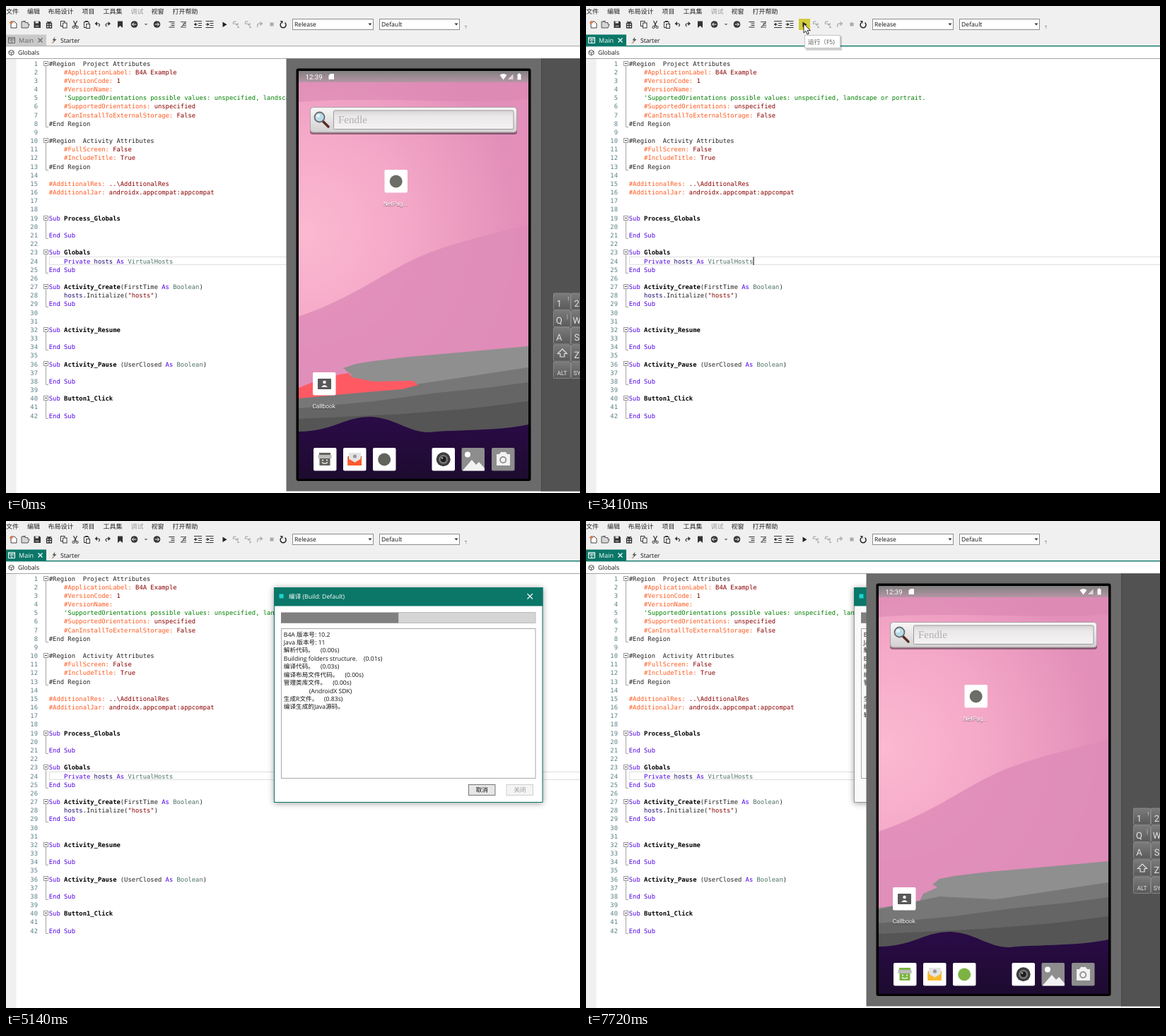
An HTML page that plays this animation: 812x690 px, repeating every 8 s.

```html
<!DOCTYPE html>
<html lang="zh">
<head>
<meta charset="utf-8">
<title>IDE build</title>
<style>
html, body { margin: 0; width: 100%; height: 100%; overflow: hidden; background: #fff; }
svg { display: block; }
text { white-space: pre; text-rendering: geometricPrecision;
  font: 8.65px "Open Sans", "Noto Sans CJK SC", "Noto Sans CJK", sans-serif; }
.code text { font: 8.84px "DejaVu Sans Mono", monospace; }
.droid text { font-family: Roboto, sans-serif; }
</style>
</head>
<body>
<svg id="stage" width="812" height="690" viewBox="0 0 812 690">
<defs>
  <linearGradient id="status" x2="0" y2="1"><stop stop-color="#808080"/><stop offset="1" stop-color="#b595a5"/></linearGradient>
  <radialGradient id="glow" gradientUnits="userSpaceOnUse" cx="420" cy="320" r="310">
    <stop stop-color="#fcb9d0"/><stop offset=".45" stop-color="#f5a9c8"/><stop offset="1" stop-color="#e28fb9"/>
  </radialGradient>
  <linearGradient id="night" x2="0" y2="1"><stop stop-color="#2a0b47"/><stop offset="1" stop-color="#1d0b2f"/></linearGradient>
  <linearGradient id="plate" x2="0" y2="1"><stop stop-color="#f8f6f7"/><stop offset="1" stop-color="#d2d0d1"/></linearGradient>
  <linearGradient id="field" x2="0" y2="1"><stop stop-color="#d8d5d6"/><stop offset=".3" stop-color="#ebe8e9"/><stop offset="1" stop-color="#f5f3f4"/></linearGradient>
  <linearGradient id="key" x2="0" y2="1"><stop stop-color="#7b7b7b"/><stop offset="1" stop-color="#5a5a5a"/></linearGradient>
  <clipPath id="screen"><path d="M414 92H739V670H414z"/></clipPath>
  <path id="arrow" d="M0 0V13L3 10.3L5 15L7.2 14L5.2 9.6H9.4z"/>
</defs>
</svg>
<script>
const LOOP = 8000, TEAL = '#0a7768', ROW = 12.17;
const stage = document.getElementById('stage');
const rect = (x, y, w, h, fill, more = '') => `<rect x="${x}" y="${y}" width="${w}" height="${h}" fill="${fill}" ${more}/>`;
const line = (d, color = '#333', w = 1, more = '') => `<path d="${d}" fill="none" stroke="${color}" stroke-width="${w}" ${more}/>`;
const area = (d, fill = '#333', more = '') => `<path d="${d}" fill="${fill}" ${more}/>`;
const dot = (x, y, r, fill, more = '') => `<circle cx="${x}" cy="${y}" r="${r}" fill="${fill}" ${more}/>`;
const text = (x, y, s, fill = '#111', more = '') => `<text x="${x}" y="${y}" fill="${fill}" ${more}>${s}</text>`;
const group = (id, body, more = '') => `<g id="${id}" ${more}>${body}</g>`;

// ---- editor ----
// A tilde and a letter switch the colour of the text that follows.
const INK = { k: '#222', o: '#ff5a1f', r: '#8b0000', g: '#008000', b: '#5000e6', i: '#1c0a6a', t: '#4c7263', B: '#000' };
const SOURCE = `~k#Region  Project Attributes
    ~o#ApplicationLabel: ~rB4A Example
    ~o#VersionCode: ~r1
    ~o#VersionName:
    ~g'SupportedOrientations possible values: unspecified, landscape or portrait.
    ~o#SupportedOrientations: ~runspecified
    ~o#CanInstallToExternalStorage: ~rFalse
~k#End Region

~k#Region  Activity Attributes
    ~o#FullScreen: ~rFalse
    ~o#IncludeTitle: ~rTrue
~k#End Region

~o#AdditionalRes: ~r..\\AdditionalRes
~o#AdditionalJar: ~randroidx.appcompat:appcompat


~bSub ~BProcess_Globals

~bEnd Sub

~bSub ~BGlobals
    ~bPrivate ~ihosts ~bAs ~tVirtualHosts
~bEnd Sub

~bSub ~BActivity_Create~k(FirstTime ~bAs ~tBoolean~k)
    ~ihosts~k.Initialize(~r"hosts"~k)
~bEnd Sub


~bSub ~BActivity_Resume

~bEnd Sub

~bSub ~BActivity_Pause ~k(UserClosed ~bAs ~tBoolean~k)

~bEnd Sub

~bSub ~BButton1_Click

~bEnd Sub`.split('\n');

function codeLine(s, i) {
  const y = (84.6 + ROW * i).toFixed(2);
  const [indent, ...parts] = s.split('~');
  const spans = parts.map(p => `<tspan fill="${INK[p[0]]}"${p[0] === 'B' ? ' font-weight="700"' : ''}>${p.slice(1)}</tspan>`);
  return text(45, y, i + 1, '#5b8087', 'text-anchor="end"') + text(60.8, y, indent + spans.join(''));
}

function fold([from, to]) {
  const y = Math.round(81.5 + ROW * (from - 1)), end = Math.round(81.5 + ROW * (to - 1)) + 4;
  return rect(53.5, y - 3.5, 6, 6, '#fff', 'stroke="#999"') + line(`M55 ${y - .5}h3`, '#444') +
    line(`M56.5 ${y + 3}V${end + .5}H60`, '#a5a5a5');
}

const menu = [[0, '文件'], [30, '编辑'], [59.5, '布局设计'], [107.5, '项目'], [137.5, '工具集'], [176.5, '调试'], [205.5, '视窗'], [235.5, '打开帮助']]
  .map(([x, s]) => text(x, 10.6, s, s === '调试' ? '#999' : '#222', 'style="font-size:9px"')).join('');

const textIcon = (x, c) => line(`M${x} 22.5h8M${x + 3} 25h5M${x + 3} 27.5h5M${x} 30h8`, c);
const indentIcon = (x, d) => line(`M${x} 21.5h11M${x + 6} 24.5h5M${x + 6} 27.5h5M${x} 30.5h11M${x} 26h5`) +
  area(`M${x + (d > 0 ? 5 : 0)} 26l${-3 * d} -2.5v5z`);
const navIcon = (x, d) => dot(x, 26, 4.8, '#333') + line(`M${x - 3} 26h6M${x + d * .5} 23.5l${d * 2.5} 2.5l${-d * 2.5} 2.5`, '#fff');
const stepIcon = x => line(`M${x + 1} 26q-1 -5 4 -4M${x + 2} 25q4 0 5 2M${x + 7.5} 24v3h-3`, '#aaa', 1.2) + dot(x + 8, 30, 1.3, '#aaa');
const undoIcon = (x, d) => line(`M${x} 25h${d * 3.5}q${d * 3} 1.5 0 4`, '#333', 1.2) + area(`M${x - d * 2} 25l${d * 3.5} -3v6z`);
const combo = (x, w, s) => rect(x + .5, 18.5, w, 15, '#fff', 'stroke="#8c8c8c"') + text(x + 3, 29.3, s) +
  area(`M${x + w - 6.5} 24.5h5l-2.5 3z`);

const toolbar =
  area('M7 22h5l3 3v6H7z', '#fff', 'stroke="#444"') + line('M5 23.5h5M7.5 21v5', '#e8703a', 1.4) +
  area('M22 31V22h4l1 1.5h4V26h2l-2 5z', '#d6d6d6', 'stroke="#555"') + line('M24 21.5h4', '#555') +
  area('M39.5 21.5h8l1.5 1.5v8h-9.5z', '#333') + rect(41.5, 21.5, 4.5, 3, '#ddd') + rect(41.5, 27, 5, 3, '#777') +
  line('M57 24.5h8M57 27.5h8M57 31h8M57.5 24v7M61 22v9M64.5 24v7M58 22l3 2l3 -2', '#333', 1.3) +
  rect(77.5, 21.5, 5.5, 7, '#fff', 'stroke="#333"') + rect(80.5, 24, 5.5, 7, '#fff', 'stroke="#333"') +
  line('M95.5 21l4 8M100.5 21l-4 8', '#333', 1.2) + dot(95.5, 30, 1.6, 'none', 'stroke="#333"') + dot(100.5, 30, 1.6, 'none', 'stroke="#333"') +
  rect(110.5, 22.5, 6.5, 8, '#fff', 'stroke="#333"') + rect(113.5, 25.5, 5, 6, '#fff', 'stroke="#333"') + rect(112, 21, 4, 2, '#333') +
  undoIcon(127.5, 1) + undoIcon(146, -1) + area('M158 21.5h7v9.5l-3.5 -3l-3.5 3z') +
  navIcon(181.5, -1) + area('M195.5 25h5l-2.5 2.5z', '#777') + navIcon(213.5, 1) +
  textIcon(230.5, '#333') + textIcon(247, '#555') + line('M254 23l-6 7') + indentIcon(266, -1) + indentIcon(282.5, 1) +
  rect(301, 18, 16, 16, '#d3cc3a', 'id="hover"') + area('M306.5 22.5l6 3.7l-6 3.7z', '#222') +
  stepIcon(320.5) + stepIcon(337.5) + line('M356 30q-2 -6 5 -5M359.5 22.5l3 2.5l-3 2.5', '#aaa', 1.3) +
  rect(373.5, 23.5, 5, 5, '#aaa') + line('M389.7 23.5a4 4 0 1 0 4.8 0', '#222', 1.5) + area('M387.5 21h4v4z') +
  combo(405, 114, 'Release') + combo(528, 113, 'Default') + line('M649 28.5h3M650 31h1.5', '#888');

const ide =
  rect(0, 0, 812, 75, '#f0f0f0') + menu + toolbar +
  rect(0, 40.5, 57, 16, TEAL, 'id="tab"') + rect(0, 56, 812, 1.6, TEAL, 'id="rule"') +
  group('tabInk',
    '<path d="M3.5 44.5h9v8h-9zM3.5 46.5h9M8 47v5M5 49h2M9.5 49h2" fill="none" stroke="currentColor"/>' +
    '<path d="M45.5 45.5l6 6M51.5 45.5l-6 6" stroke="currentColor" stroke-width="1.2"/>' +
    text(18, 51.7, 'Main', 'currentColor', 'style="font-size:9px"')) +
  area('M69.5 43.5l-4 5h2.5l-2.5 5l6 -6.5h-3z', '#555') + line('M64.5 53l3 -3', '#f08a3c') + text(77, 51.7, 'Starter') +
  rect(0, 57.6, 812, 17, '#fff') + area('M7.5 62.5l3.5 1.8v3.5l-3.5 2l-3.5 -2v-3.5z', '#fff', 'stroke="#444"') +
  line('M4 64.5l3.5 1.7l3.5 -1.7M7.5 66v3.5', '#444', .8) + text(17, 69.2, 'Globals') +
  rect(0, 74, 812, 1, '#a4a4a4') + rect(0, 75, 14.5, 615, '#f0f0f0') +
  line('M812 355.5H61.5V366.5H812', '#dedede') +
  `<g class="code">${SOURCE.map(codeLine).join('')}</g>` +
  [[1, 8], [10, 13], [19, 21], [23, 25], [27, 29], [32, 34], [36, 38], [40, 42]].map(fold).join('') +
  rect(236.5, 355.5, 1, 11.5, '#000', 'id="caret"');

const runTip = rect(311, 43, 51, 20, '#000', 'opacity=".18"') + rect(309.5, 41.5, 50, 18, '#fff', 'stroke="#c4c4c4"') +
  text(314, 53.5, '运行（F5)', '#555');

// ---- build dialog ----
const LOG = ['B4A 版本号: 10.2', 'Java 版本号: 11', '解析代码。    (0.00s)', 'Building folders structure.    (0.01s)',
  '编译代码。    (0.03s)', '编译布局文件代码。    (0.00s)', '管理类库文件。    (0.00s)', '                (AndroidX SDK)',
  '生成R文件。', '编译生成的Java源码。', '转换字节码-优化dexer模式。'];
const logY = i => 163.6 + 11.42 * i;
const took = (i, x, s) => text(x, logY(i), s, '#111', `id="took${i}"`);
const button = (x, s, ink, edge, fill) => rect(x + .5, 373.5, 37.5, 15, fill, `stroke="${edge}"`) +
  text(x + 19.3, 384.2, s, ink, 'text-anchor="middle"');
const dialog =
  rect(379.5, 94.5, 379.5, 304, '#fff', `id="pane" style="filter:drop-shadow(0 1px 4px #0006)"`) +
  rect(379, 94, 380.5, 26.5, TEAL) + rect(386.5, 103.5, 6, 6, '#1fd3d0') +
  group('caption', text(400, 110.3, '编译 (Build: Default)', '#fff') + line('M737.5 103l7.5 7.5M745 103l-7.5 7.5', '#fff', 1.1)) +
  rect(389.5, 129.5, 359.5, 15, '#d5d5d5', 'stroke="#bcbcbc"') + rect(389, 130, 0, 14.5, '#808080', 'id="bar"') +
  rect(389.5, 152.5, 359.5, 212, '#fff', 'id="list" stroke="#a8a8a8"') +
  LOG.map((s, i) => text(392.8, logY(i), s, '#111', `id="log${i}"`)).join('') +
  took(8, 450, '(0.83s)') + took(9, 488.5, '(2.06s)') +
  button(654, '取消', '#111', '#777', '#e6e6e6') + button(707.5, '关闭', '#999', '#cfcfcf', '#f4f4f4');

// ---- phone emulator ----
const tile = (x, y, fill = '#fff') => rect(x, y, 32.5, 32.5, fill, 'rx="2"');
const caption = (x, y, s) => text(x, y, s, '#fff', 'text-anchor="middle" style="font-size:8.4px;text-shadow:0 1px 1px #0008"');
const keyCap = (row, col, s, size, dx = 8) => rect(774.5 + 25 * col, 407 + 24.3 * row, 24, 23.3, 'url(#key)', 'stroke="#858585" rx="1"') +
  text(774.5 + 25 * col + dx, 425.7 + 24.3 * row, s, '#e2e2e2', `text-anchor="middle" style="font-size:${size}px"`);
const keys = ['1 2', 'Q W', 'A S', '\u00a0 Z'].map((r, i) => r.split(' ').map((s, c) => keyCap(i, c, s, 13)).join('')).join('') +
  `<g font-weight="700">${keyCap(4, 0, 'ALT', 8.5, 12)}${keyCap(4, 1, 'SYM', 8.5, 12)}</g>` +
  text(794.5, 418, '!', '#ccc') + text(793, 443, '|', '#ccc') +
  line('M787 486l6.5 6.5h-3.5v4.5h-6v-4.5h-3.5z', '#e2e2e2', 1.2);

const hills =
  area('M739 482L640 491L570 497L520 503L500 507L490 515L497 519L477 528L472 538L450 543L414 548V620H739z', '#8f8f8f') +
  area('M414 550L500 532L580 536L660 524L739 512V620H414z', '#777') +
  area('M414 570L520 560L610 548L680 541L739 533V620H414z', '#656565') +
  area('M414 585L560 578L660 570L739 560V620H414z', '#555');
const lava =
  area('M520 503L495 507L477 513L484 519L495 527L540 533L576 531z', '#8f8f8f') +
  area('M414 541L434 533L467 523L485 520L489 526L520 532L576 531L583 537L560 543L500 548L414 556z', '#ff5a63');
const wallpaper =
  rect(414, 92, 325, 578, 'url(#glow)') +
  area('M414 108H739V132C650 140 520 128 414 136z', '#da87b2', 'opacity=".6"') +
  area('M739 310C690 322 640 334 600 349C540 372 500 410 414 440V560H739z', '#df8cb9', 'opacity=".85"') +
  hills + group('lava', lava) +
  area('M414 603C465 602 475 583 515 582C550 583 570 605 600 604C630 600 690 603 739 593V670H414z', 'url(#night)');

const search =
  rect(430, 144, 293, 38, '#0006', 'rx="4"') + rect(430.5, 143.5, 292, 35.5, 'url(#plate)', 'rx="4" stroke="#aaa2a6"') +
  rect(463.5, 148, 254.5, 26.5, 'url(#field)', 'rx="2" stroke="#9f9a9c"') +
  text(470, 165.5, 'Fendle', '#b3afb1', 'style="font:15px \'Liberation Serif\',serif"') +
  line('M448 163l8 8', '#5b2a25', 3.5, 'stroke-linecap="round"') + dot(443.5, 157.5, 7, '#b9dbe8', 'stroke="#6d6d6d" stroke-width="1.8"') +
  dot(441.5, 155.5, 2.5, '#e6f5fa');

const apps =
  tile(535.5, 232) + dot(551.7, 248.5, 9, '#6b6d66') + caption(551, 283.2, 'NetPag...') +
  tile(434, 519) + rect(441, 528, 19, 15, '#585858', 'rx="1"') + dot(450.5, 533, 2.3, '#eee') + area('M446 540q4.5 -6 9 0z', '#eee') +
  caption(449.7, 570.3, 'Callbook') +
  tile(435, 626) + area('M443 633h16v3h-16zM443.5 640h15v11h-15z', 'currentColor') + rect(441.5, 636, 19, 5, '#bbb') +
  dot(448, 643.5, 1, '#fff') + dot(454, 643.5, 1, '#fff') + line('M447 646.5q4 3.5 8 0', '#fff', 1.2) +
  tile(477, 626) + rect(483.5, 638, 19.5, 13, 'var(--mail)') + area('M485 633h17v9l-8.5 5l-8.5 -5z', '#e3e3e3') + dot(493.5, 638, 2.6, '#999') +
  area('M483.5 641l9.8 6l9.7 -6v10h-19.5z', 'var(--flap)') +
  tile(519, 626) + dot(535.2, 642.5, 9, 'currentColor') +
  tile(602.5, 626) + dot(618.7, 642.3, 10, '#3d3d3d') + dot(618.7, 642.3, 6.5, '#777') + dot(618.7, 642.3, 4, '#1d1d1d') + dot(617, 640.5, 1.2, '#bbb') +
  tile(644.5, 626, '#8d8d8d') + dot(653, 635.5, 4, '#fff') + area('M646 658l13 -15l6 7l4 -4l8 9v3.5h-31z', '#f2f2f2') +
  tile(687, 626, '#8d8d8d') + area('M694 635h4l2 -3h7l2 3h4v16h-19z', '#f2f2f2') + dot(703.2, 643, 5, '#8d8d8d') + dot(703.2, 643, 3.2, '#f2f2f2');

const phone =
  rect(396.5, 74.5, 416, 613, '#6b6b6b') + rect(757, 74.5, 55, 613, '#525252') + rect(757, 74.5, 1, 613, '#474747') +
  rect(410.5, 88.5, 332, 584.5, '#000', 'rx="3"') +
  `<g clip-path="url(#screen)">${wallpaper}${rect(414, 92, 325, 16, 'url(#status)')}</g>` +
  text(423.5, 103.7, '12:39', '#fff', 'font-weight="500" style="font-size:9.7px"') +
  area('M459 96h5v8h-7.5v-5.5z', '#fff') + area('M698.5 98q5 -4 10 0l-5 6.5z', '#fff') + area('M717.5 96.5v7.5h-7.5z', '#e0d8dc') +
  area('M723.5 96.5h1.5v-1h2v1h1.5v8h-5z', '#fff') +
  search + apps + keys +
  group('trail', '<use href="#arrow" x="619" y="444" fill="#cf7099"/><use href="#arrow" x="665" y="526" fill="#9d4a78"/>');

// ---- task bar preview ----
const thumb = rect(408, 652, 98, 38, '#4a4a4a') + dot(420, 664, 5.5, '#fff') +
  text(432, 667.2, 'Handset Simul...', '#fff') + rect(414, 677, 48, 13, '#6b6b6b') + rect(416, 679, 44, 11, '#e593b9') +
  rect(418, 683, 40, 4, '#fff') + rect(416, 679, 44, 1.5, '#9a808c');
const thumbTip = rect(342, 633, 235.5, 15, '#000', 'opacity=".2"') + rect(339.5, 630.5, 235.5, 15, '#fff', 'stroke="#b0b0b0"') +
  text(344, 641, 'Handset Simulator - 5in_Unit_Baseline_31_sample:5554', '#666');

stage.insertAdjacentHTML('beforeend', ide + group('dialog', dialog) + group('phone', phone, 'class="droid"') +
  group('runTip', runTip) + group('thumb', thumb) + group('thumbTip', thumbTip) +
  '<use id="pointer" href="#arrow" fill="#fff" stroke="#111" stroke-width=".9"/>' +
  group('beam', line('M-3 -5.5h2.5M3 -5.5h-2.5M0 -5V5M-3 5.5h2.5M3 5.5h-2.5', '#222', 1.1)));

// ---- motion ----
const PATH = [[380, 745, 650], [455, 710, 595], [530, 664, 526], [605, 618, 444], [680, 589, 395], [840, 589, 395],
  [1250, 547, 252], [1390, 547, 264], [1630, 547, 264], [1860, 357, 194], [2400, 167, 43], [2480, 167, 43],
  [3030, 308, 27], [3180, 308, 25], [3410, 308, 25], [3730, 313, 65], [3970, 313, 65], [4200, 580, 645], [4380, 578, 692]];
const PROGRESS = [[3730, 0], [3970, 67], [4200, 129], [4380, 138.5], [4590, 138.5], [4700, 152], [4900, 163], [5140, 166.2],
  [6620, 166.2], [6730, 180], [6930, 190.5], [7160, 193.9]];

// Linear interpolation through [time, ...values] keys.
function track(keys, t) {
  const i = keys.findIndex(k => k[0] > t);
  if (i < 1) return keys.at(i).slice(1);
  const a = keys[i - 1], b = keys[i], u = (t - a[0]) / (b[0] - a[0]);
  return a.slice(1).map((v, n) => v + (b[n + 1] - v) * u);
}

const el = id => document.getElementById(id);
const show = (id, on) => { el(id).style.display = on ? '' : 'none'; };

function draw(t) {
  const focused = t >= 3410, back = t >= 7640, idle = t >= 7400;
  el('tab').setAttribute('fill', focused ? TEAL : '#c9c9c9');
  el('rule').setAttribute('fill', focused ? TEAL : '#b8b8b8');
  el('tabInk').style.color = focused ? '#fff' : '#666';
  show('hover', t >= 2950 && t < 3650);
  show('runTip', focused && t < 3650);
  show('caret', focused && t < 3730);

  show('dialog', t >= 3730);
  el('bar').setAttribute('width', track(PROGRESS, t)[0]);
  el('caption').style.opacity = idle ? .5 : 1;
  el('pane').setAttribute('stroke', idle ? '#999' : TEAL);
  for (const id of ['pane', 'list']) el(id).setAttribute('fill', idle ? '#fafafa' : '#fff');
  show('took8', t >= 4590);
  show('log9', t >= 4590);
  show('took9', t >= 6620);
  show('log10', t >= 6620);

  show('phone', !focused || back);
  const style = el('phone').style;
  style.color = back ? '#7cb342' : '#62645c';
  style.setProperty('--mail', back ? '#f0a020' : '#c8401c');
  style.setProperty('--flap', back ? '#fbb92c' : '#ff5a2c');
  show('lava', !back);
  show('trail', t >= 680 && !back);

  show('thumb', t >= 7080 && !back);
  show('thumbTip', idle && !back);
  el('thumbTip').style.opacity = Math.min(1, Math.max(0, (t - 7400) / 160));

  const [x, y] = track(PATH, t), inCode = x < 379 && y > 75, moving = t >= 380 && t < 4380;
  show('pointer', moving && !inCode);
  show('beam', moving && inCode);
  for (const id of ['pointer', 'beam']) el(id).setAttribute('transform', `translate(${x} ${y})`);
}

const start = performance.now();
function tick() {
  draw((performance.now() - start) % LOOP);
  requestAnimationFrame(tick);
}
tick();
</script>
</body>
</html>
```
